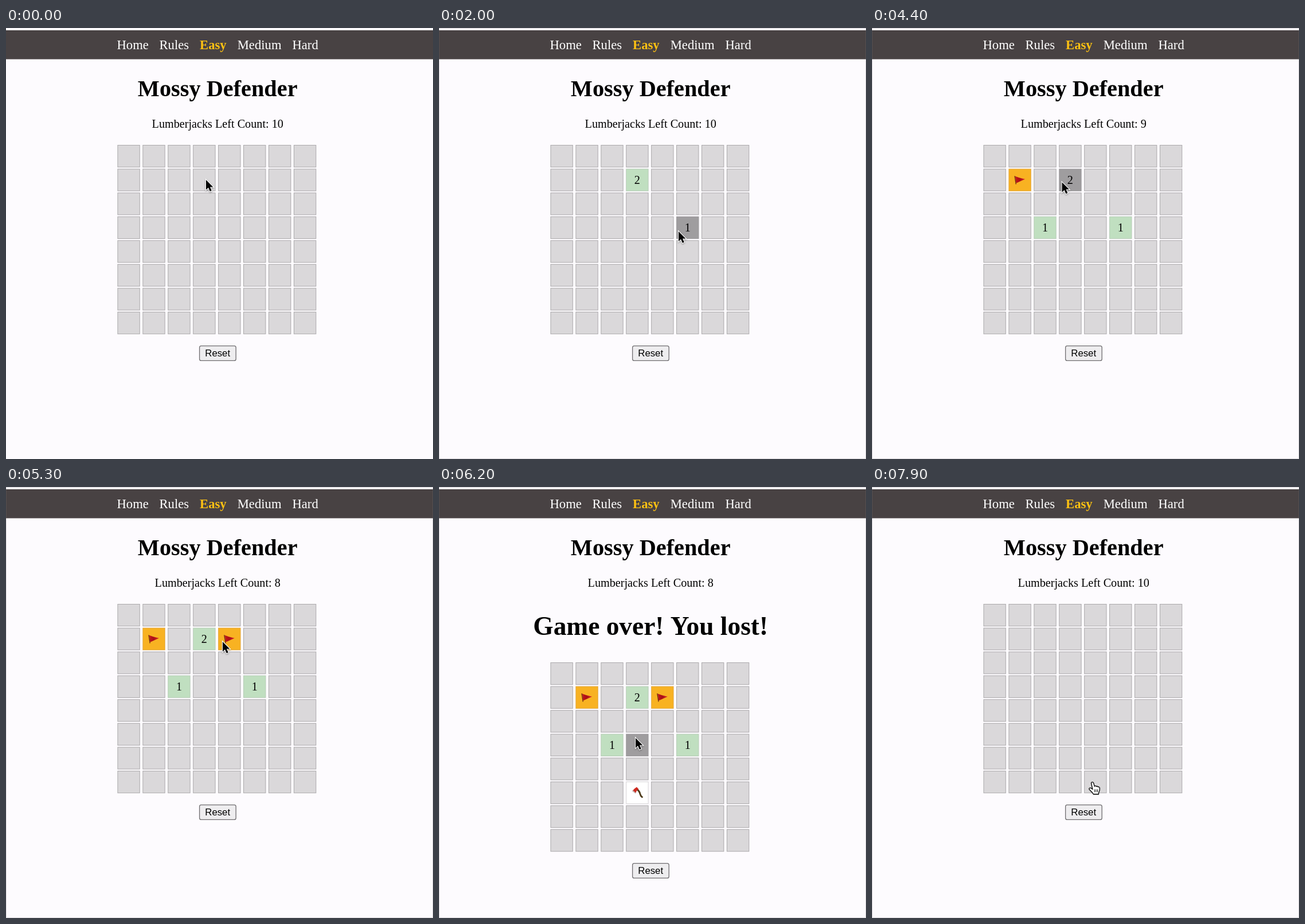
An HTML page with a canvas that plays this animation: 745 px wide and 752 px high, repeating every 8000 ms.

```html
<!DOCTYPE html>
<html lang="en">
<head>
<meta charset="utf-8">
<title>Mossy Defender</title>
<style>
  html, body { margin: 0; width: 100%; height: 100%; overflow: hidden; background: #fdfbfe; }
  canvas { display: block; }
</style>
</head>
<body>
<canvas id="stage" width="745" height="752"></canvas>
<script>
const ctx = document.getElementById('stage').getContext('2d');
const W = 745, H = 752, LOOP = 8000, STEP = 100;
const SERIF = '"Liberation Serif", serif', SANS = '"Liberation Sans", sans-serif';
const CENTER = 369.2, LOST_SHIFT = 102;
const GRID = { x: 194.4, y: 204, dx: 43.93, dy: 41.58, w: 39.4, h: 39.2 };
const LOST_AT = 6100, RESET_AT = 7700;

// Pointer stops: time, x, y
const PATH = [
  [0, 349, 265], [1000, 349, 265], [1500, 418, 346], [1800, 418, 346],
  [2000, 418, 355], [2600, 300, 357], [2800, 300, 357], [3300, 256, 267],
  [3600, 256, 267], [3900, 260, 268], [4000, 260, 268], [4700, 378, 270],
  [5300, 378, 270], [5800, 371, 395], [6000, 343, 438], [6500, 343, 438],
  [7100, 387, 644], [7300, 386, 662], [7700, 386, 662], [7900, 384, 515]
];

// Player moves on the board
const MOVES = [
  { t: 500, c: 3, r: 1, mark: '2' },
  { t: 1700, c: 5, r: 3, mark: '1' },
  { t: 2700, c: 2, r: 3, mark: '1' },
  { t: 3500, c: 1, r: 1, mark: 'flag' },
  { t: 5100, c: 4, r: 1, mark: 'flag' },
  { t: LOST_AT, c: 3, r: 5, mark: 'axe' }
];

const COLORS = {
  closed: ['#dad8da', '#aba9ab'],
  open: ['#c0dfc0', '#b5cbb5'],
  hover: ['#9f9d9f', '#9a989a'],
  flag: ['#f8b222', '#e0a63a'],
  axe: ['#ffffff', '#d6d4d6']
};

function pointerAt(t) {
  const i = PATH.findIndex(p => p[0] > t);
  if (i < 0) return PATH[PATH.length - 1].slice(1);
  const [t0, x0, y0] = PATH[i - 1], [t1, x1, y1] = PATH[i];
  const k = (t - t0) / (t1 - t0), e = k * k * (3 - 2 * k);
  return [x0 + (x1 - x0) * e, y0 + (y1 - y0) * e];
}

function text(str, x, y, font, color = '#000', align = 'center') {
  ctx.font = font;
  ctx.fillStyle = color;
  ctx.textAlign = align;
  ctx.fillText(str, x, y);
}

function shape(points, fill) {
  ctx.beginPath();
  points.forEach(([x, y]) => ctx.lineTo(x, y));
  ctx.closePath();
  ctx.fillStyle = fill;
  ctx.fill();
}

function at(x, y, draw) {
  ctx.save();
  ctx.translate(x, y);
  draw();
  ctx.restore();
}

function flag() {
  const red = ctx.createLinearGradient(-8, 0, 9, 0);
  red.addColorStop(0, '#c4161c');
  red.addColorStop(0.45, '#a90f16');
  red.addColorStop(1, '#dd2a2a');
  shape([[-8, -6.5], [-1, -4], [9, -1.5], [0, 2.5], [-6.5, 5.5]], red);
  ctx.strokeStyle = '#6a2a12';
  ctx.lineWidth = 1.3;
  ctx.beginPath();
  ctx.moveTo(-9, -7);
  ctx.lineTo(-6.8, 7.5);
  ctx.stroke();
}

function axe() {
  ctx.lineCap = 'round';
  ctx.strokeStyle = '#4f3d1d';
  ctx.lineWidth = 3;
  ctx.beginPath();
  ctx.moveTo(-1.5, -7);
  ctx.quadraticCurveTo(4, -3, 5, 2);
  ctx.quadraticCurveTo(6, 6, 8.5, 7.5);
  ctx.stroke();
  shape([[-8.5, -3], [-5, -7], [-1, -10], [2.5, -6.5], [-1, -3.5], [-3, 1]], '#cf2a20');
  shape([[-8.8, -3.4], [-7.6, -4.4], [-2.4, 0], [-3, 1.4]], '#b9b2b0');
}

function button(y, active) {
  ctx.beginPath();
  ctx.roundRect(337.6, y + 0.6, 63.6, 25.8, 3);
  ctx.fillStyle = active ? '#e4e3e6' : '#eeedef';
  ctx.fill();
  ctx.strokeStyle = '#6f6d70';
  ctx.lineWidth = 1.3;
  ctx.stroke();
  text('Reset', CENTER, y + 19, '16.8px ' + SANS);
}

function arrow() {
  const p = new Path2D('M0 0V17.2L4 13.5L6.8 20L9.8 18.7L7 12.4H12.4Z');
  ctx.shadowColor = 'rgba(0,0,0,.35)';
  ctx.shadowBlur = 2.5;
  ctx.shadowOffsetY = 1.2;
  ctx.strokeStyle = '#fff';
  ctx.lineWidth = 2.2;
  ctx.stroke(p);
  ctx.shadowColor = 'transparent';
  ctx.fillStyle = '#000';
  ctx.fill(p);
}

function hand() {
  const p = new Path2D('M-1.5 1.5C-1 -.8 2 -.6 2.6 1.6L4.2 7.2C5 6 7 6.2 7.4 7.6' +
    'C8.4 6.8 10 7.2 10.4 8.4C11.6 7.8 13.2 8.6 13.3 10.2C13.7 14 12.7 15.6 11.6 18' +
    'L11.3 21H2.4C1 17.8 -2.4 15.6 -5 12.4C-6 10.4 -3.4 9.2 -1.8 10.6L.8 12.4Z');
  ctx.shadowColor = 'rgba(0,0,0,.3)';
  ctx.shadowBlur = 2;
  ctx.shadowOffsetY = 1;
  ctx.fillStyle = '#fff';
  ctx.fill(p);
  ctx.shadowColor = 'transparent';
  ctx.strokeStyle = '#000';
  ctx.lineWidth = 1.3;
  ctx.stroke(p);
  ctx.lineWidth = 1;
  ctx.beginPath();
  for (const x of [4.3, 6.9, 9.5]) {
    ctx.moveTo(x, 12.5);
    ctx.lineTo(x, 17.5);
  }
  ctx.stroke();
}

function inside(px, py, x, y, w, h) {
  return px >= x && px < x + w && py >= y && py < y + h;
}

function board(t, moves, shift, px, py) {
  const canHover = t >= 100 && t < RESET_AT;
  for (let r = 0; r < 8; r++) for (let c = 0; c < 8; c++) {
    const x = GRID.x + c * GRID.dx, y = GRID.y + shift + r * GRID.dy;
    const move = moves.find(m => m.c === c && m.r === r);
    const mark = move && move.mark;
    let kind = !mark ? 'closed' : COLORS[mark] ? mark : 'open';
    const solid = kind === 'flag' || kind === 'axe';
    if (canHover && !solid && inside(px, py, x, y, GRID.w, GRID.h)) kind = 'hover';
    const [fill, edge] = COLORS[kind];
    ctx.fillStyle = edge;
    ctx.fillRect(x, y, GRID.w, GRID.h);
    ctx.fillStyle = fill;
    ctx.fillRect(x + 1, y + 1, GRID.w - 2, GRID.h - 2);
    if (!mark) continue;
    const cx = x + GRID.w / 2, cy = y + GRID.h / 2;
    if (mark === 'flag') at(cx, cy, flag);
    else if (mark === 'axe') at(cx, cy, axe);
    else text(mark, cx, cy + 6.6, '20.2px ' + SERIF);
  }
}

function header() {
  ctx.fillStyle = '#484243';
  ctx.fillRect(0, 4, W, 50.5);
  const links = [['Home', 193.4], ['Rules', 267.4], ['Easy', 338], ['Medium', 403.7], ['Hard', 499.4]];
  for (const [name, x] of links) {
    const on = name === 'Easy';
    text(name, x, 37, (on ? 'bold ' : '') + '22.7px ' + SERIF, on ? '#fdc112' : '#fff', 'left');
  }
  text('Mossy Defender', CENTER, 119, 'bold 40.3px ' + SERIF);
}

function draw(t) {
  const [px, py] = pointerAt(t);
  const moves = t < RESET_AT ? MOVES.filter(m => t >= m.t) : [];
  const lost = t >= LOST_AT && t < RESET_AT;
  const shift = lost ? LOST_SHIFT : 0;
  const left = 10 - moves.filter(m => m.mark === 'flag').length;

  ctx.fillStyle = '#fdfbfe';
  ctx.fillRect(0, 0, W, H);
  header();
  text('Lumberjacks Left Count: ' + left, CENTER, 174, '20.2px ' + SERIF);
  if (lost) text('Game over! You lost!', CENTER, 258, 'bold 45.4px ' + SERIF);
  board(t, moves, shift, px, py);

  const onButton = inside(px, py, 337, 554 + shift, 64, 27);
  button(554 + shift, onButton);
  if (t >= 100) {
    ctx.strokeStyle = 'rgba(120,118,120,.25)';
    ctx.lineWidth = 1;
    ctx.strokeRect(0.5, 0.5, W - 1, H - 1);
  }
  at(px, py, onButton || t >= RESET_AT ? hand : arrow);
}

function tick() {
  const t = performance.now() % LOOP;
  draw(Math.floor(t / STEP) * STEP);
  requestAnimationFrame(tick);
}
tick();
</script>
</body>
</html>
```
